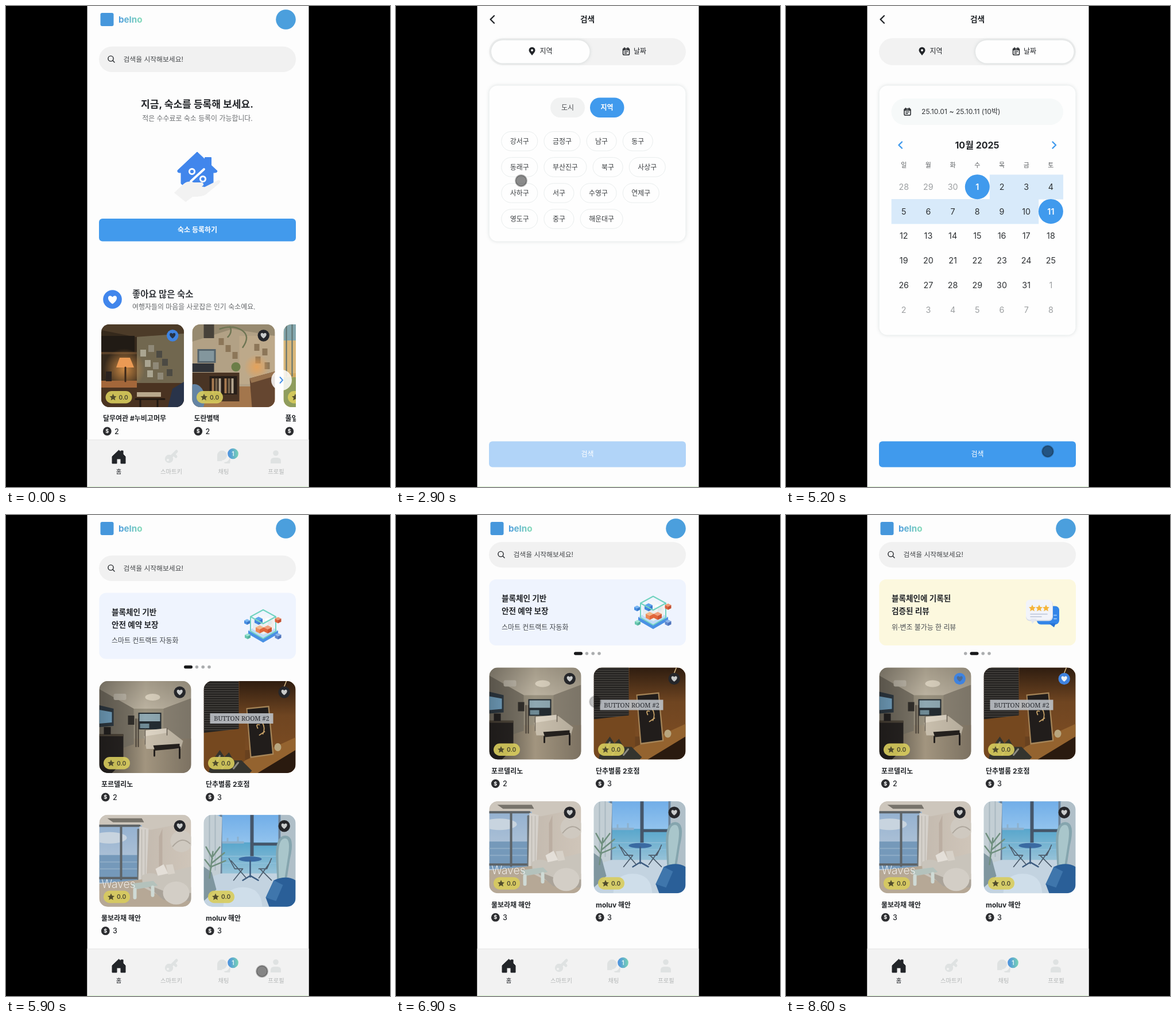
Recreate the animation shown at these times as an HTML page. Size 669 by 837 pixels, loop 8700 ms.

```html
<!DOCTYPE html>
<html lang="ko">
<head>
<meta charset="utf-8">
<title>숙소 검색</title>
<style>
html, body { margin: 0; width: 100%; height: 100%; overflow: hidden; background: #000; }
svg { display: block; width: 669px; height: 837px; }
text { font-family: Inter, "Noto Sans CJK KR", "Noto Sans CJK", "Noto Sans KR", sans-serif; }
.soft { filter: drop-shadow(0 0 3px rgba(70, 100, 100, .2)); }
.line { fill: none; stroke-linecap: round; stroke-linejoin: round; }
</style>
</head>
<body>
<svg id="stage" viewBox="0 0 669 837"></svg>
<script>
const BLUE = '#409aed', INK = '#222529';
const rect = (x, y, w, h, fill, r = 0, more = '') =>
  `<rect x="${x}" y="${y}" width="${w}" height="${h}" rx="${r}" fill="${fill}" ${more}/>`;
const circle = (x, y, r, fill, more = '') => `<circle cx="${x}" cy="${y}" r="${r}" fill="${fill}" ${more}/>`;
const oval = (x, y, rx, ry, fill) => `<ellipse cx="${x}" cy="${y}" rx="${rx}" ry="${ry}" fill="${fill}"/>`;
const path = (d, fill, more = '') => `<path d="${d}" fill="${fill}" ${more}/>`;
const line = (d, color, width) => `<path class="line" d="${d}" stroke="${color}" stroke-width="${width}"/>`;
const group = (x, y, body, more = '') => `<g transform="translate(${x} ${y})" ${more}>${body}</g>`;
// y is the vertical middle of the text
const text = (x, y, str, size, fill = INK, weight = 400, anchor = 'start', more = '') =>
  `<text x="${x}" y="${y + size * .365}" font-size="${size}" fill="${fill}" font-weight="${weight}" text-anchor="${anchor}" ${more}>${str}</text>`;
const mid = (x, y, str, size, fill, weight, more) => text(x, y, str, size, fill, weight, 'middle', more);

const heartPath = 'M0 5C-9-1-4-7.5 0-3C4-7.5 9-1 0 5Z';
const starPath = 'M0-6L1.8-2 6-1.6 2.9 1.2 3.8 5.5 0 3.2-3.8 5.5-2.9 1.2-6-1.6-1.8-2Z';
const star = (x, y, fill) => group(x, y, path(starPath, fill));
const pin = (x, y) => group(x, y,
  path('M0 7C-4 2-5.5 0-5.5-2A5.5 5.5 0 0 1 5.5-2C5.5 0 4 2 0 7Z', INK) + circle(0, -2, 1.9, '#fff'));
const dateIcon = (x, y) => group(x, y,
  `<rect x="-5.5" y="-5" width="11" height="11" rx="1.8" fill="none" stroke="${INK}" stroke-width="1.5"/>` +
  line('M-5-2.7H5M-3-6.3V-4M3-6.3V-4', INK, 1.7) + line('M-2.8.3H2.8M-2.8 3H.8', INK, 1.3));

/* Room pictures, drawn in their own square */
const photos = {
  desk: rect(0, 0, 144, 144, '#35291c') + rect(62, 14, 82, 98, '#71674f') + path('M0 0H144V16L60 22 0 10Z', '#4c3b28') +
    rect(0, 20, 58, 32, '#211b15') + rect(0, 48, 62, 4, '#5a4129') + circle(40, 78, 36, 'url(#glow)') +
    [[68, 44], [82, 36], [96, 46], [76, 62], [90, 66], [106, 60], [80, 80], [98, 84], [114, 78]]
      .map(([x, y], i) => rect(x, y, 10, 12, ['#aaa591', '#8f8978', '#4c4a43'][i % 3])).join('') +
    rect(0, 102, 144, 42, '#4a3321') + rect(0, 98, 62, 12, '#a4673a') + path('M32 58H50L57 75H26Z', '#eb9a54') +
    line('M42 75V99', '#3a2718', 3) + rect(8, 82, 10, 17, '#2a2320') + path('M116 144L124 112 144 100V144Z', '#29344a') +
    rect(62, 118, 42, 8, '#b8a88c') + line('M60 130H110M68 130V144M98 130V144', '#211912', 3),
  shelf: rect(0, 0, 144, 144, '#b2a185') + path('M0 0H144V20L70 8 0 30Z', '#978a70') + rect(82, 20, 62, 84, '#bda98a') +
    rect(0, 108, 144, 36, '#a3764c') + rect(9, 43, 32, 24, '#55646c') + rect(12, 46, 26, 18, '#83969d') +
    rect(0, 68, 38, 15, '#303338') + rect(0, 84, 82, 50, '#493424') + rect(30, 90, 48, 32, '#271e18') +
    [34, 40, 46, 56, 62, 68].map((x, i) => rect(x, 94, 4, 26, ['#a77b51', '#75634c', '#b5a58e'][i % 3])).join('') +
    rect(20, 0, 18, 24, '#47423a') + line('M48 8Q70 0 86 10T88 40M66 4Q70 14 62 22', '#6f7654', 2.5) +
    [[46, 24], [58, 36], [70, 48], [108, 34], [122, 42], [110, 56], [126, 66]]
      .map(([x, y]) => rect(x, y, 9, 12, '#8c7658')).join('') + circle(76, 74, 8, '#6b7e48') +
    circle(112, 74, 22, 'url(#glow)') + path('M100 94L144 82V144H104Z', '#654630') + path('M100 94L144 82V90L103 102Z', '#98734f') +
    oval(4, 130, 18, 26, '#6484a4'),
  yard: rect(0, 0, 144, 144, '#d3aa61') + rect(0, 0, 144, 28, '#83a6ad') + path('M0 28H40V85H0Z', '#d9b77a') +
    line('M5 0V90M15 0V90', '#5c6f6d', 2) + rect(0, 92, 144, 52, '#8f9d5d'),
  bedroom: rect(0, 0, 160, 160, '#99917f') + path('M0 0H160V30L112 48H60L0 14Z', 'url(#ceiling)') +
    path('M112 48L160 30V160H112Z', '#8c8475') + path('M0 130L60 100H160V160H0Z', 'url(#floor)') + path('M0 14L60 48V110L0 130Z', '#7f786a') +
    oval(93, 28, 13, 6, '#d6cdbb') + rect(68, 55, 40, 29, '#242c32') + rect(70, 57, 36, 13, '#8fa8b2') + rect(71, 74, 16, 8, '#6f8a95') +
    rect(25, 22, 22, 11, '#c6bfb0', 3) + path('M0 42L25 48V78L0 80Z', '#34404a') + path('M0 50L22 54V72L0 74Z', '#83b8da') +
    rect(50, 60, 11, 16, '#33302c') + line('M64 66V114M68 66V114', '#4a4239', 2) +
    path('M78 96L120 84 146 104 142 118H82Z', '#c9bfad') + path('M80 96V86L118 82V90Z', '#ded5c5') + line('M80 84V110M118 82V94', '#6f675b', 1.5) +
    path('M94 112L140 109V117L97 121Z', '#26221f') + line('M96 120V130M140 115V134', '#26221f', 3) +
    path('M0 95L42 93V140L22 160H0Z', '#2a2624') + rect(0, 92, 42, 4, '#544b3e') + rect(8, 80, 12, 13, '#282524') +
    rect(0, 0, 160, 160, 'url(#dusk)'),
  frame: rect(0, 0, 160, 160, '#68411f') + rect(62, 0, 98, 120, 'url(#wood)') + rect(0, 0, 61, 90, '#242220') +
    Array.from({ length: 22 }, (_, i) => rect(0, i * 4, 61, 1.3, '#4a4744')).join('') + path('M0 90L72 82V160H0Z', '#75481f') +
    path('M72 138L160 98V120L96 160H50Z', '#94632f') + path('M94 160L160 120V160Z', '#2a1a0f') +
    path('M74 47L114 43 122 128 81 134Z', '#a68558') + path('M76 49L112 45.5 119.5 126 83 131Z', '#211d1b') +
    line('M94 82Q90 74 97 76M103 92Q108 82 102 72M97 94L106 88', '#c8a268', 1.8) + oval(129, 115, 6, 7, '#b8a67f') +
    path('M8 160L14 140 28 120 36 132 44 124 52 138 66 138 84 156 80 160Z', '#34342e') +
    line('M20 146L28 130M32 152L42 136M52 152L60 142', '#8c8a80', 3) + line('M144 0L136 20', '#d8bd8b', 1.5) +
    rect(11, 56, 110, 18, '#bcc0c6', 0, 'opacity=".9"') +
    mid(66, 65, 'BUTTON ROOM #2', 11, '#292b30', 500, 'style="font-family:\'Noto Serif\',serif"'),
  lounge: rect(0, 0, 160, 160, 'url(#plaster)') + path('M0 0H160V12L90 26 0 18Z', '#cdc6bc') + path('M14 6H74L78 13H24Z', '#77736b') +
    rect(0, 18, 74, 114, 'url(#cloudy)') + oval(18, 40, 30, 10, '#c8d4df') + rect(0, 70, 74, 48, '#7599ba') +
    line('M0 82H74M0 94H74', '#8dacc6', 2) + line('M0 19H70M38 20V112M0 110H72', '#5d6367', 4) + line('M68 26V112', '#687075', 4) +
    path('M70 20L86 24 82 116H68Z', '#d5d1cb') + line('M74 26V112M80 26V112', '#bdb9b3', 1.5) +
    path('M104 38L110 24V100H104Z', '#bbaea2') + circle(143, 46, 19, '#cfc9c0') + line('M128 55Q143 36 158 50', '#aea79d', 2) +
    path('M0 120L78 112 160 126V160H0Z', '#b6a896') + path('M74 106Q86 98 100 104L160 90V148L116 146 76 126Z', '#c9c4bb') +
    path('M76 118L116 134 160 136V150L112 148Z', '#aaa399') + oval(134, 136, 23, 20, '#d3cec6') +
    path('M98 94L112 86 120 102 102 106Z', '#e4dfd8') + path('M116 87L128 86 132 102 120 104Z', '#d8d2c9') +
    path('M54 120L94 115 102 123 62 130Z', '#b4c2bc') + line('M62 130V144M93 126V140', '#cfdad5', 6) +
    text(4, 120, 'Waves', 19.5, '#fff', 200),
  seaside: rect(0, 0, 160, 160, '#a9c4d8') + rect(26, 0, 110, 56, 'url(#sky)') + rect(26, 48, 110, 58, 'url(#sea)') +
    path('M32 50V46H40V40H43V46H58V38H61V46H70V50Z', '#8db0cc') + line('M28 72H128M28 84H128M28 96H128', '#8fc0da', 1.5) +
    rect(81, 0, 6, 72, '#45566a') + line('M84 51H128', '#45566a', 5) + line('M30 0V106M132 0V60', '#6b8299', 4) +
    path('M0 0H20L32 4 29 106 0 130Z', '#c3ced4') + line('M10 0V100M20 0V96', '#a9b8c0', 2) + path('M134 0H160V130H134Z', '#b0bfc8') +
    path('M0 112L30 102H130L160 116V160H0Z', '#c3d3e0') + path('M126 78Q124 36 142 36T150 78L144 116H128Z', '#85a5ae') +
    path('M130 76Q129 42 141 41T146 78L141 110H131Z', '#a9c6cb') + path('M0 90L14 100 22 130 0 150Z', '#7f969f') +
    line('M10 110L16 64M15 76L4 56M16 72L28 56M14 84L36 66M13 92L2 78M14 90L38 80', '#6f8f7e', 2.5) +
    oval(81, 77, 20, 4.5, '#3a6aa2') + line('M81 80V108M81 106L68 114M81 106L95 114', '#3d5c80', 2.5) +
    line('M44 76L54 94H68M48 80L74 110M68 94L52 114M118 76L110 94H96M116 82L96 110M98 94L118 114', '#4c5c6c', 1.7) +
    path('M34 160Q36 126 68 126T102 160Z', '#cfdeea') + path('M108 144L122 114Q144 104 160 114V160H114Z', '#2a5f98') +
    path('M108 144L122 114 138 122 126 150Z', '#3f76ac')
};

const heartButton = (x, y, id, liked) =>
  group(x, y, circle(0, 0, 10.2, liked ? '#3f83e0' : '#25262a') + path(heartPath, liked ? '#263347' : '#c9cbcb'), `id="${id}"`);

function card(x, y, size, photo, title, price, id, liked) {
  const inset = size === 160 ? 3.5 : 3;
  return group(x, y,
    `<g clip-path="url(#clip${size})">${photos[photo]}</g>` +
    heartButton(size - 19.8, 19.5, id, liked) +
    rect(7.5, size - 28, 46, 21.5, '#d9cc5c', 10.7, 'opacity=".9"') + star(20.5, size - 17.2, '#514c2c') +
    text(30.5, size - 17.2, '0.0', 10.2, '#48442f', 600) +
    text(inset, size + 20, title, 12, INK, 700) +
    circle(inset + 7.3, size + 42, 7.4, '#2c2d30') + mid(inset + 7.3, size + 42, '$', 9, '#fff', 700) +
    text(inset + 20, size + 42, price, 12.5, INK, 500));
}

const header = rect(142, 0, 385, 46, '#fdfdfd') + rect(164.5, 12, 23, 23, '#4697dc', 3) +
  text(196, 23, 'belno', 15.2, 'url(#brand)', 700) + circle(487.5, 23.5, 17.3, '#4b9fdd');
const searchBar = rect(162, 70.5, 343, 44.5, '#f1f1f1', 22) +
  `<circle cx="182.5" cy="91.5" r="4.6" fill="none" stroke="${INK}" stroke-width="1.4"/>` + line('M186 95L189 98', INK, 1.4) +
  text(204.5, 92.5, '검색을 시작해보세요!', 11.8, '#45484b');

const grey = '#dfe2e2';
const nav = rect(141.5, 755, 386, 82, '#f2f2f2') + rect(141.5, 754.5, 386, 1, '#e6e6e6') +
  path('M185 784L196.5 773 200 776V774H204V780L208 784V796H200V788H193V796H185Z', INK, `stroke="${INK}" stroke-linejoin="round"`) +
  circle(284, 788, 7.2, grey) + line('M288 784L297 775M292 780L296 784', grey, 5) + circle(282, 790, 2, '#f2f2f2') +
  circle(376.5, 782, 8.5, grey) + path('M368 782V792H377Z', grey) + path('M380 794Q391 793 389 782 392 788 390 796H384Q380 796 380 794Z', grey) +
  circle(395.5, 779, 9.3, 'url(#badge)') + mid(395.5, 779, '1', 10.5, '#fff', 500) +
  circle(470, 778, 4.8, grey) + path('M461 796V792Q461 786 467 786H473Q479 786 479 792V796Z', grey) +
  [[196.5, '홈'], [288, '스마트키'], [379, '채팅'], [470.5, '프로필']]
    .map(([x, label], i) => mid(x, 810, label, 10.3, i ? '#b4b7b7' : INK, i ? 400 : 500)).join('');

const house = path('M333 254L368 287Q368 290 364 290H361V311L354 318H315L305 309V290H301Q298 289 299 286Z', '#4186ec', 'stroke="#4186ec" stroke-linejoin="round"') +
  rect(346, 263, 12, 20, '#4186ec', 1) +
  path('M293 325L309 310Q317 303 327 307L342 307Q347 311 341 314L346 315 370 303Q376 303 371 309L348 328Q343 332 325 332L313 341Z', '#f2f2f2') +
  line('M345 284L322 305', '#fff', 3.8) +
  [[324, 288], [343, 301]].map(([x, y]) => circle(x, y, 4.6, 'none', 'stroke="#fff" stroke-width="3"')).join('');

const hostHome = mid(333, 170.5, '지금, 숙소를 등록해 보세요.', 17.1, INK, 700) +
  mid(333.5, 195.5, '적은 수수료로 숙소 등록이 가능합니다.', 11.95, '#6c6f72') + house +
  rect(162, 370, 343, 39.5, '#429aec', 6) + mid(333.5, 390, '숙소 등록하기', 12, '#fff', 700) +
  circle(185.5, 510.5, 16.3, '#4186ec') + group(185.5, 511, path(heartPath, '#fff', 'transform="scale(1.5)"')) +
  text(220, 501, '좋아요 많은 숙소', 15.4, '#33363b', 700) +
  text(220, 524, '여행자들의 마음을 사로잡은 인기 숙소예요.', 11.95, '#66696c') +
  '<g clip-path="url(#row)">' +
  card(166, 554, 144, 'desk', '달무여관 #누비고머무', 2, 'top1', true) +
  card(324.5, 554, 144, 'shelf', '도란별택', 2, 'top2') +
  card(483.5, 554, 144, 'yard', '풀잎채', 2, 'top3') +
  circle(480, 651, 18, '#fff', 'opacity=".85"') + line('M477.5 646L482 651 477.5 656', '#4590e6', 1.9) + '</g>';

const block = (x, y, s, top, left, right) => group(x, y,
  path(`M0-${s}L${s}-${s / 2} 0 0-${s}-${s / 2}Z`, top) + path(`M-${s}-${s / 2}L0 0V${s}L-${s} ${s / 2}Z`, left) +
  path(`M${s}-${s / 2}L0 0V${s}L${s} ${s / 2}Z`, right));
const cubeArt = path('M448 188L474 201 448 216 422 201Z', '#bfdcf8') + path('M422 201L448 215 474 201V207L448 222 422 207Z', '#4a91e4') +
  block(448, 190, 18, '#f4f7f9', '#e4edf2', '#f2eee8') + block(440, 184, 7, '#5ca4ed', '#4388df', '#3977cf') +
  block(456, 186, 7, '#ffffff', '#eef2f4', '#e2e8ec') + block(442, 199, 7, '#f3b98a', '#ec8a56', '#e2663a') +
  block(456, 199, 7, '#f1a07d', '#e2663a', '#cd5431') +
  line('M448 165L470 177V202L448 215 426 202V177ZM426 177L448 189 470 177', '#72d3c0', 2) +
  block(420, 186, 5, '#79b8f5', '#478fe3', '#3878ca') + block(474, 183, 5.5, '#f29a72', '#da613b', '#c34f30') +
  block(421, 211, 5, '#9ce5d0', '#67c7b0', '#55b19d') + block(474, 211, 5.5, '#8fb5e9', '#6189cd', '#4d72bb');
const chatArt = rect(437, 182, 39, 32, '#3385e8', 7) + path('M458 212H470L467 219Z', '#2873d4') + line('M467 198H471M467 204H471', '#91c4fb', 2) +
  rect(418, 172, 47, 36, '#d8dde8', 7) + rect(418, 171, 46, 35, '#f2f4fa', 7) + path('M426 204H437L429 213Z', '#e2e7f1') +
  [429, 441, 453].map(x => star(x, 185.5, '#f5b53b')).join('') + line('M426 196H455M426 200.5H445', '#b9c3d8', 1.6);
const banner = (x, fill, first, second, note, art) => group(x, 0, rect(162.3, 135.5, 342.7, 115, fill, 12) +
  text(184, 169, first, 13.6, INK, 700) + text(184, 191, second, 13.6, INK, 700) + text(184, 219, note, 11.95, '#45494e') + art);

const guestHome = searchBar + '<g clip-path="url(#banner)"><g id="slides">' +
  banner(0, '#eff4fe', '블록체인 기반', '안전 예약 보장', '스마트 컨트랙트 자동화', cubeArt) +
  banner(343, '#fcf8de', '블록체인에 기록된', '검증된 리뷰', '위·변조 불가능 한 리뷰', chatArt) + '</g></g>' +
  rect(310, 261.7, 5.5, 5.6, '#17181a', 2.8, 'id="dot0"') + rect(330, 261.7, 5.5, 5.6, '#abadaf', 2.8, 'id="dot1"') +
  circle(343.2, 264.5, 2.8, '#abadaf') + circle(354, 264.5, 2.8, '#abadaf') +
  card(162.5, 289, 160, 'bedroom', '포르델리노', 2, 'like0') + card(344.5, 289, 160, 'frame', '단추별룸 2호점', 3, 'like1') +
  card(162.5, 521.7, 160, 'lounge', '물보라채 해안', 3, 'like2') + card(344.5, 521.7, 160, 'seaside', 'moluv 해안', 3, 'like3');

/* Search page */
const chip = (x, y, w, label, on) =>
  rect(x, y, w, 33.5, on ? BLUE : '#fefefe', 16.7, `stroke="${on ? BLUE : '#e9eded'}"`) + mid(x + w / 2, y + 17, label, 11.95, on ? '#fff' : '#3c3f42');
const chips = (rows, picked) => rows.map((row, r) => {
  let x = 183.7;
  return row.split(' ').map(label => {
    const w = 30 + 11 * label.length, out = chip(x, 218.5 + r * 45.1, w, label, label === picked);
    x += w + 11.2;
    return out;
  }).join('');
}).join('');
const cities = ['강원도 경기도 경상남도', '경상북도 광주광역시 대구광역시', '대전광역시 부산광역시 서울특별시',
  '울산광역시 인천광역시 전라남도', '전라북도 제주특별자치도 충청남도', '충청북도'];
const districts = ['강서구 금정구 남구 동구', '동래구 부산진구 북구 사상구', '사하구 서구 수영구 연제구', '영도구 중구 해운대구'];

const panel = h => rect(162.5, 138.5, 342, h, '#fefefe', 14, 'class="soft"');
const toggle = second => rect(269, 159.5, 60, 34.5, second ? '#f1f2f2' : BLUE, 17) +
  mid(299, 177, '도시', 12, second ? '#4a4d50' : '#fff', second ? 400 : 700) +
  rect(338, 159.5, 59.5, 34.5, second ? BLUE : '#f6f8f8', 17) + mid(367.5, 177, '지역', 12, second ? '#fff' : '#a8acac', second ? 700 : 400);
const cityPanel = picked => panel(361) + toggle(false) + chips(cities, picked);
const districtPanel = picked => panel(271) + toggle(true) + chips(districts, picked);

function calendarPanel(picks) {
  const col = i => 205.2 + (i % 7) * 42.7, row = i => 314.7 + Math.floor(i / 7) * 42.75;
  const label = ['날짜를 선택해주세요', '25.10.01', '25.10.01 ~ 25.10.11 (10박)'][picks];
  let out = panel(434) + rect(183.5, 161, 299.5, 46, '#f6f9f9', 23) + dateIcon(211.5, 184) + text(236, 184, label, 12.2, '#34373a') +
    line('M202 236.5L196.5 242 202 247.5M464.5 236.5L470 242 464.5 247.5', BLUE, 2.4) + mid(333, 242, '10월 2025', 16, INK, 700);
  if (picks === 2) out += rect(354.8, 293.5, 128.2, 43, '#d8eafa') + rect(183.7, 336, 256.5, 43.3, '#d8eafa');
  [...'일월화수목금토'].forEach((day, i) => out += mid(col(i), 277, day, 11, '#5b5e61'));
  for (let i = 0; i < 42; i++) {
    const day = i < 3 ? 28 + i : i < 34 ? i - 2 : i - 33, outside = i < 3 || i > 33;
    const on = (i === 3 && picks > 0) || (i === 13 && picks > 1);
    if (on) out += circle(col(i), row(i), 21.5, BLUE);
    out += mid(col(i), row(i), day, 14.3, on ? '#fff' : outside ? '#9c9fa1' : '#2c2f32', on ? 600 : 400);
  }
  return out;
}

const searchPage = line('M171 17L164.5 23.3 171 29.7', INK, 2.3) + mid(333.5, 22.7, '검색', 13.7, INK, 700) +
  rect(162, 56, 343, 47, '#f2f2f2', 23.5) + rect(166, 59.5, 171.5, 40, '#fefefe', 20, 'id="tab" class="soft"') +
  pin(237, 79) + text(250.5, 79, '지역', 11.95, INK, 500) + dateIcon(401, 79) + text(414, 79, '날짜', 11.95, INK, 500) +
  [cityPanel(), cityPanel('부산광역시'), districtPanel(), districtPanel('수영구'), calendarPanel(0), calendarPanel(1), calendarPanel(2)]
    .map((body, i) => `<g id="panel${i}">${body}</g>`).join('') +
  rect(162, 757.5, 343, 45, BLUE, 6, 'id="submit"') + mid(333.5, 780, '검색', 11.95, '#fff', 500);

const box = (id, x, y, w, h, r = 0) => `<clipPath id="${id}">${rect(x, y, w, h, '#000', r)}</clipPath>`;
const stops = colors => colors.map((c, i) => `<stop offset="${i / (colors.length - 1)}" stop-color="${c}"/>`).join('');
const across = (id, ...colors) => `<linearGradient id="${id}">${stops(colors)}</linearGradient>`;
const down = (id, ...colors) => `<linearGradient id="${id}" x2="0" y2="1">${stops(colors)}</linearGradient>`;
document.getElementById('stage').innerHTML = '<defs>' +
  box('clip144', 0, 0, 144, 144, 14) + box('clip160', 0, 0, 160, 160, 15) + box('row', 162, 550, 343, 204) + box('banner', 162, 135, 343, 117, 12) +
  across('brand', '#4d9be0', '#83dbb7') + across('badge', '#4c8fe0', '#78d2b5') + across('plaster', '#b9b0a6', '#cfc5b9') +
  across('floor', '#6f6759', '#a2957f', '#8d816f') + across('dusk', '#0000004d', '#00000000', '#0000001f') +
  down('wood', '#2f1d10', '#6f4521', '#7a4b22') + down('ceiling', '#a39a88', '#bbb2a0') + down('cloudy', '#94b1d0', '#c3d0dc') +
  down('sky', '#71aee8', '#97c6ee') + down('sea', '#58a6cc', '#9ac4d8') +
  `<radialGradient id="glow">${stops(['#efa04ecc', '#efa04e00'])}</radialGradient></defs>` +
  rect(0, 0, 669, 837, '#000') + rect(141.5, 0, 386, 837, '#fdfdfd') +
  `<g id="host">${searchBar + hostHome}</g><g id="guest"><g id="scroll">${guestHome}</g></g>` +
  `<g id="chrome">${header + nav}</g><g id="search">${searchPage}</g>` + rect(142, 836, 385, 1, '#d9f3d0') +
  `<g id="touch">${circle(0, 0, 9.7, '#000', 'fill-opacity=".45" stroke="#000" stroke-opacity=".27" stroke-width="2.4"')}</g>`;

/* Timeline, in ms */
const LOOP = 8700, STEP = 100;
const touchPath = [[300, 338, 96], [700, 344, 98], [1200, 370, 273], [1600, 324, 325], [2200, 318, 328], [2900, 218, 304],
  [3250, 352, 325], [3650, 416, 79], [3900, 404, 110], [4300, 334, 314], [4700, 461, 357], [5200, 456, 775], [5900, 446, 794],
  [6400, 390, 480], [6900, 347, 325], [7400, 303, 286], [7900, 318, 290], [8400, 485, 286]];
const panelStarts = [800, 1700, 1900, 3300, 3700, 4300, 4700];
const $ = id => document.getElementById(id);
const show = (id, on) => { $(id).style.display = on ? '' : 'none'; };
const ease = (t, from, to) => {
  const p = Math.min(1, Math.max(0, (t - from) / (to - from)));
  return p * p * (3 - 2 * p);
};
const move = (id, x, y) => $(id).setAttribute('transform', `translate(${x} ${y})`);

function like(id, on, heart) {
  const [disc, mark] = $(id).children;
  disc.setAttribute('fill', on ? '#3f83e0' : '#25262a');
  mark.setAttribute('fill', on ? heart : '#c9cbcb');
}

function moveTouch(t) {
  const next = touchPath.findIndex(p => p[0] > t);
  show('touch', next > 0);
  if (next < 1) return;
  const [t0, x0, y0] = touchPath[next - 1], [t1, x1, y1] = touchPath[next];
  const k = ease(t, t0, t1);
  move('touch', x0 + (x1 - x0) * k, y0 + (y1 - y0) * k);
  $('touch').style.opacity = t >= 6800 && t < 7200 ? .55 : 1;
}

function draw(t) {
  const searching = t >= 800 && t < 5500;
  show('host', t < 800);
  show('search', searching);
  show('chrome', !searching);
  show('guest', t >= 5500);

  const current = panelStarts.filter(start => start <= t).length - 1;
  panelStarts.forEach((_, i) => show('panel' + i, i === current));
  $('tab').setAttribute('x', 166 + 164 * ease(t, 3600, 3900));
  $('submit').setAttribute('fill', t < 4700 ? '#b1d4f8' : BLUE);

  move('scroll', 0, -23.5 * ease(t, 6400, 6800));
  move('slides', -343 * ease(t, 8100, 8400), 0);
  const second = t >= 8200;
  $('dot0').setAttribute('width', second ? 5.5 : 15);
  $('dot0').setAttribute('fill', second ? '#abadaf' : '#17181a');
  $('dot1').setAttribute('x', second ? 320.5 : 329.7);
  $('dot1').setAttribute('width', second ? 15 : 5.5);
  $('dot1').setAttribute('fill', second ? '#17181a' : '#abadaf');
  like('like0', t >= 7500, '#4f6b91');
  like('like1', t >= 8400, '#eef3f8');
  moveTouch(t);
}

const begin = performance.now();
function tick() {
  const t = (performance.now() - begin) % LOOP;
  draw(Math.floor(t / STEP) * STEP);
  requestAnimationFrame(tick);
}
tick();
</script>
</body>
</html>
```
